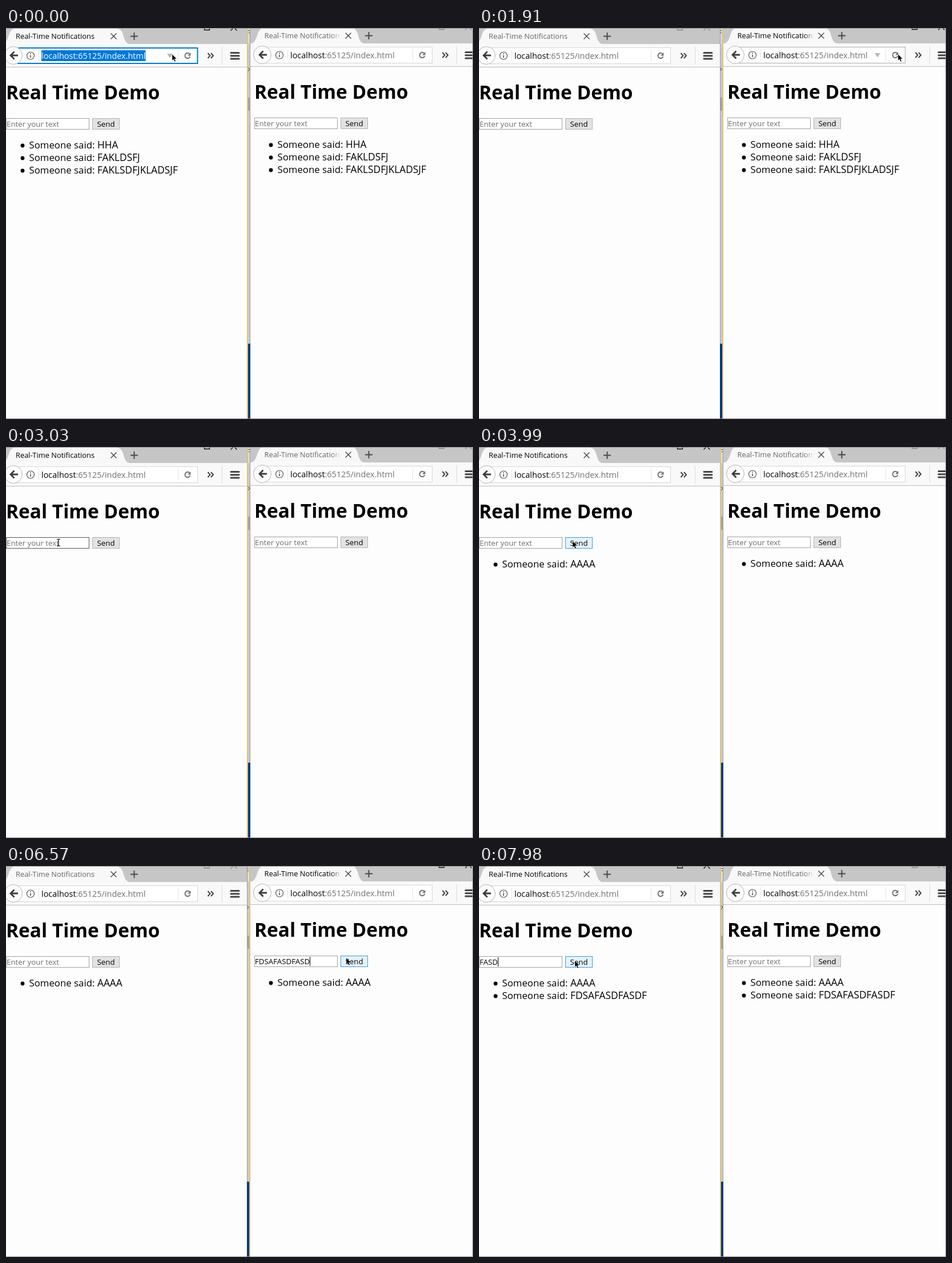
An HTML page that plays this animation: 818x685 px, repeating every 8000 ms.

```html
<!DOCTYPE html>
<html lang="en">
<head>
<meta charset="utf-8">
<title>Real-Time Notifications</title>
<style>
  html, body { margin: 0; width: 100%; height: 100%; overflow: hidden; background: #fdfdfd; }
  svg { display: block; font-family: "Open Sans", "Noto Sans", sans-serif; }
  text { white-space: pre; }
  .tab { font-size: 12.9px; }
  .url { font-size: 14.45px; }
  .h1 { font-size: 33.4px; font-weight: 700; }
  .field { font-size: 13.3px; }
  .item { font-size: 16.8px; }
  .msg { font-size: 17.3px; }
</style>
</head>
<body>
<svg id="stage" width="818" height="685" viewBox="0 0 818 685"></svg>
<script>
const LOOP = 8000, PAGE = '#fdfdfd', BLUE = '#0078d7';
const stage = document.getElementById('stage');
const pen = document.createElement('canvas').getContext('2d');

// [time, pointer x, pointer y, what changes]
const steps = [
  [0, 291, 46, { active: 0, sel: true, load: -1, focus: -1, text: ['', ''],
    list: ['HHA,FAKLDSFJ,FAKLSDFJKLADSJF', 'HHA,FAKLDSFJ,FAKLSDFJKLADSJF'] }],
  [150, 303, 47],
  [280, 316, 46],
  [420, 318, 46, { load: 0 }],
  [550, 318, 46, { load: -1, list0: '' }],
  [690, 330, 46],
  [820, 376, 45],
  [950, 458, 43],
  [1100, 694, 44],
  [1250, 722, 45],
  [1390, 734, 46],
  [1790, 734, 46, { active: 1, sel: false }],
  [1920, 734, 46, { load: 1 }],
  [2050, 734, 46],
  [2180, 734, 46],
  [2340, 734, 46, { load: -1, list1: '' }],
  [2470, 690, 70],
  [2610, 460, 140],
  [2740, 200, 165],
  [2870, 100, 168],
  [3000, 92, 168, { active: 0, focus: 0 }],
  [3270, 92, 168, { text0: 'A' }],
  [3390, 92, 168, { text0: 'AA' }],
  [3540, 92, 168, { text0: 'AAAA' }],
  [3690, 138, 167],
  [3840, 164, 165],
  [3990, 164, 165, { text0: '', list0: 'AAAA', list1: 'AAAA', focus: -1 }],
  [4140, 340, 174],
  [4290, 557, 184],
  [4560, 541, 187],
  [4830, 516, 167],
  [4980, 516, 167, { active: 1, focus: 1 }],
  [5690, 516, 167, { text1: 'F' }],
  [5830, 516, 167, { text1: 'FDS' }],
  [5970, 516, 167, { text1: 'FDSAF' }],
  [6120, 516, 167, { text1: 'FDSAFAS' }],
  [6270, 516, 167, { text1: 'FDSAFASDF' }],
  [6420, 560, 165, { text1: 'FDSAFASDFAS' }],
  [6570, 596, 161, { text1: 'FDSAFASDFASD' }],
  [6690, 596, 161, { text1: 'FDSAFASDFASDF' }],
  [6830, 596, 161, { text1: '', focus: -1, list0: 'AAAA,FDSAFASDFASDF', list1: 'AAAA,FDSAFASDFASDF' }],
  [6970, 480, 172],
  [7110, 230, 170],
  [7250, 100, 168],
  [7390, 92, 168, { active: 0, focus: 0 }],
  [7660, 130, 168],
  [7780, 168, 166, { text0: 'FA' }],
  [7980, 168, 166, { text0: 'FASD' }]
];

// Each step inherits everything it does not change.
let last = {};
const states = steps.map(([t, x, y, change = {}]) => {
  const s = { ...last, ...change, t, x, y };
  for (const key of ['text', 'list']) {
    s[key] = s[key].map((v, i) => change[key + i] ?? v);
  }
  return last = s;
});

const text = (x, y, cls, str, fill = '#000') =>
  `<text x="${x}" y="${y}" class="${cls}" fill="${fill}">${str}</text>`;
const rect = (x, y, w, h, fill, stroke = 'none', sw = 1) =>
  `<rect x="${x}" y="${y}" width="${w}" height="${h}" fill="${fill}" stroke="${stroke}" stroke-width="${sw}"/>`;
const line = (d, stroke, w = 1, extra = '') =>
  `<path d="${d}" fill="none" stroke="${stroke}" stroke-width="${w}" ${extra}/>`;
const circle = (x, y, r, fill, stroke, w = 1) =>
  `<circle cx="${x}" cy="${y}" r="${r}" fill="${fill}" stroke="${stroke}" stroke-width="${w}"/>`;
const cross = (x, y, r) => `M${x - r} ${y - r}l${2 * r} ${2 * r}m0 ${-2 * r}l${-2 * r} ${2 * r}`;
const within = (s, x, y, w, h) => s.x >= x && s.x <= x + w && s.y >= y && s.y <= y + h;

function fieldWidth(str) {
  pen.font = '13.3px "Open Sans", "Noto Sans", sans-serif';
  return pen.measureText(str).width;
}

function tabBar(i, s, a, r) {
  const on = s.active === i, loading = s.load === i, ctl = on ? '#111' : '#888';
  let out = rect(a - 10, 0, 440, 29, '#c6c6c6');
  out += `<path d="M${a - 7} 28.500C${a + 7} 27 ${a + 2} 1 ${a + 16} 1H${r + 193}C${r + 211} 1 ${r + 201} 28 ${r + 219} 28.500Z" fill="#f8f8f8"/>`;
  if (loading) {
    out += circle(a + 25, 14, 6, 'none', '#d2d2d2', 2.5);
    out += line(`M${a + 25} 8a6 6 0 0 1 6 6`, '#8c8c8c', 2.5,
      `transform="rotate(${s.t * 0.7 % 360} ${a + 25} 14)"`);
  }
  out += text(a + (loading ? 39 : 17), 19, 'tab', 'Real-Time Notifications', on ? '#000' : '#666');
  out += rect(r + 158, 4, 40, 22, 'url(#fade' + i + ')');
  out += line(cross(r + 188.5, 14.5, 5), '#444', 1.4);
  out += line(`M${r + 218} 14.500h13m-6.500 -6.500v13`, '#484848', 2);
  out += line(`M${r + 347.5} 0v3.500h9v-3.500`, ctl, 1.3);
  out += line(`M${r + 393.5} 4.500l5.500 -5.500l5.500 5.500`, ctl, 1.3);
  return out;
}

function toolBar(i, s, a, r) {
  const hover = within(s, a + 50, 34, r + 286 - a, 29);
  const back = Math.hypot(s.x - a - 13, s.y - 48) < 15;
  const focus = i === 0 && s.sel;
  let out = rect(a - 10, 28, 440, 40, '#f9f9f9');
  out += line(`M${a - 10} 68.500h440`, '#bdbdbd');
  out += focus ? rect(a + 13, 35, r + 322.5 - a, 27, '#fff', BLUE, 2)
    : rect(a + 13.5, 34.5, r + 322 - a, 28, '#fff', hover ? '#ababab' : '#d6d6d6');
  out += circle(a + 13, 48, 15.5, back ? '#f0f0f0' : '#fcfcfc', back ? '#888' : '#b4b4b4');
  out += line(`M${a + 21} 48h-13m6.500 -6.500l-6.500 6.500l6.500 6.500`, '#3c3c3c', 2.8);
  out += circle(a + 43, 48.5, 6.5, 'none', '#505050', 1.2);
  out += line(`M${a + 43} 47.500v4.500m0 -7.800v1.700`, '#505050', 1.6);
  out += line(`M${a + 57.5} 38v20M${r + 301.5} 38v21`, '#e2e2e2');
  if (focus) {
    out += rect(a + 62, 39, 182.5, 19, BLUE);
    out += text(a + 62, 53.5, 'url', 'localhost:65125/index.html', '#fff');
  } else {
    out += text(a + 62, 53.5, 'url', 'localhost<tspan fill="#707070">:65125/index.html</tspan>');
  }
  if (focus || hover) out += `<path d="M${r + 282} 45h10l-5 7.500z" fill="#b8b8b8"/>`;
  if (s.load === i) {
    out += line(cross(r + 318, 48.5, 4), '#d3140c', 2.5);
  } else {
    out += line(`M${r + 321.5} 45.300a4.600 4.600 0 1 0 1 4.700`, '#737373', 2);
    out += `<path d="M${r + 323.5} 43v5.500h-5.500z" fill="#737373"/>`;
  }
  out += line(`M${r + 353.5} 44l4 4.500l-4 4.500m5.500 -9l4 4.500l-4 4.500`, '#444', 2);
  out += line(`M${r + 378.5} 33v31`, '#dadada');
  out += line(`M${r + 394} 43.500h14m-14 5.300h14m-14 5.300h14`, '#444', 3, 'stroke-linecap="round"');
  return out;
}

function page(i, s, a) {
  const value = s.text[i];
  const onField = within(s, a, 158, 145, 20), onSend = within(s, a + 151, 158, 48, 20);
  let out = text(a, 125, 'h1', 'Real Time Demo');
  out += rect(a + 0.5, 158.5, 145, 19, '#fff', onField ? '#555' : '#a0a0a0');
  out += value ? text(a + 1, 173, 'field', value) : text(a + 1, 173, 'field', 'Enter your text', '#6c6c6c');
  if (value && s.focus === i) {
    out += line(`M${Math.round(a + 1 + fieldWidth(value)) + 0.5} 160v16`, '#000');
  }
  out += rect(a + 151.5, 158.5, 47, 19, onSend ? '#e5f1fb' : '#e2e2e2', onSend ? '#3b9be6' : '#b4b4b4');
  out += text(a + 159.5, 173, 'field', 'Send');
  s.list[i].split(',').filter(Boolean).forEach((msg, n) => {
    const y = 211 + n * 22;
    out += circle(a + 29, y - 5, 3.4, '#000', 'none');
    out += text(a + 40.5, y, 'item', 'Someone said:') + text(a + 160, y, 'msg', msg);
  });
  return out;
}

function win(i, state) {
  const a = i * 435.5, r = i * 411, s = { ...state, y: state.y + i };
  const b = Math.floor(a);
  return `<g clip-path="url(#win${i})"><g transform="translate(0 ${-i})">` +
    rect(b - 10, 0, 440, 690, PAGE) + tabBar(i, s, a, r) + toolBar(i, s, b + i, r) +
    (s.load === i ? '' : page(i, s, b)) + '</g></g>';
}

// Narrow slice of the desktop between the windows, edged by the active one.
function gap(active) {
  const x = active ? 422 : 424;
  return rect(422, 0, 6, 685, '#cbcbcb') +
    rect(x, 0, 4, 28, '#dcdcdc') +
    rect(x, 122, 4, 23, '#a2a2a2') +
    line(`M${x} 4.500h3m-2 4h2M${x} 69.500l3 2.500l-3 4`, '#444') +
    rect(x, 553, 4, 132, '#003a80') +
    rect(active ? 426 : 422.5, 0, 1.5, 685, '#e9be55') +
    line(active ? 'M422.500 0V553' : 'M427.500 0V553', '#9c9c9c');
}

function pointer(s) {
  const beam = within(s, 0, 158, 145, 20) || within(s, 435, 157, 145, 20);
  return beam
    ? line(`M${s.x - 3} ${s.y - 6.5}h2l1 1l1 -1h2m-3 1v10m-3 1h2l1 -1l1 1h2`, '#000', 1.2)
    : `<path transform="translate(${s.x} ${s.y})" d="M0 0V11L2.500 8.700L4.500 13L6.300 12.200L4.400 8H8Z" stroke="#fff" stroke-width=".4"/>`;
}

const fade = (i, x) =>
  `<linearGradient id="fade${i}" gradientUnits="userSpaceOnUse" x1="${x}" x2="${x + 17}">` +
  '<stop offset="0" stop-color="#f8f8f8" stop-opacity="0"/><stop offset="1" stop-color="#f8f8f8"/></linearGradient>';
const clip = (i, x, w) => `<clipPath id="win${i}">${rect(x, 0, w, 685, '#000')}</clipPath>`;
const defs = `<defs>${fade(0, 159)}${fade(1, 570)}${clip(0, 0, 422)}${clip(1, 428, 390)}</defs>`;

function draw(s) {
  stage.innerHTML = defs + gap(s.active) + win(0, s) + win(1, s) +
    line('M0 .500H817.500V684.500H0', '#8e8e8e') + pointer(s);
}

let shown = null;
function tick() {
  const now = performance.now() % LOOP;
  const s = states.findLast(st => st.t <= now);
  if (s !== shown) draw(shown = s);
  requestAnimationFrame(tick);
}
tick();
</script>
</body>
</html>
```
